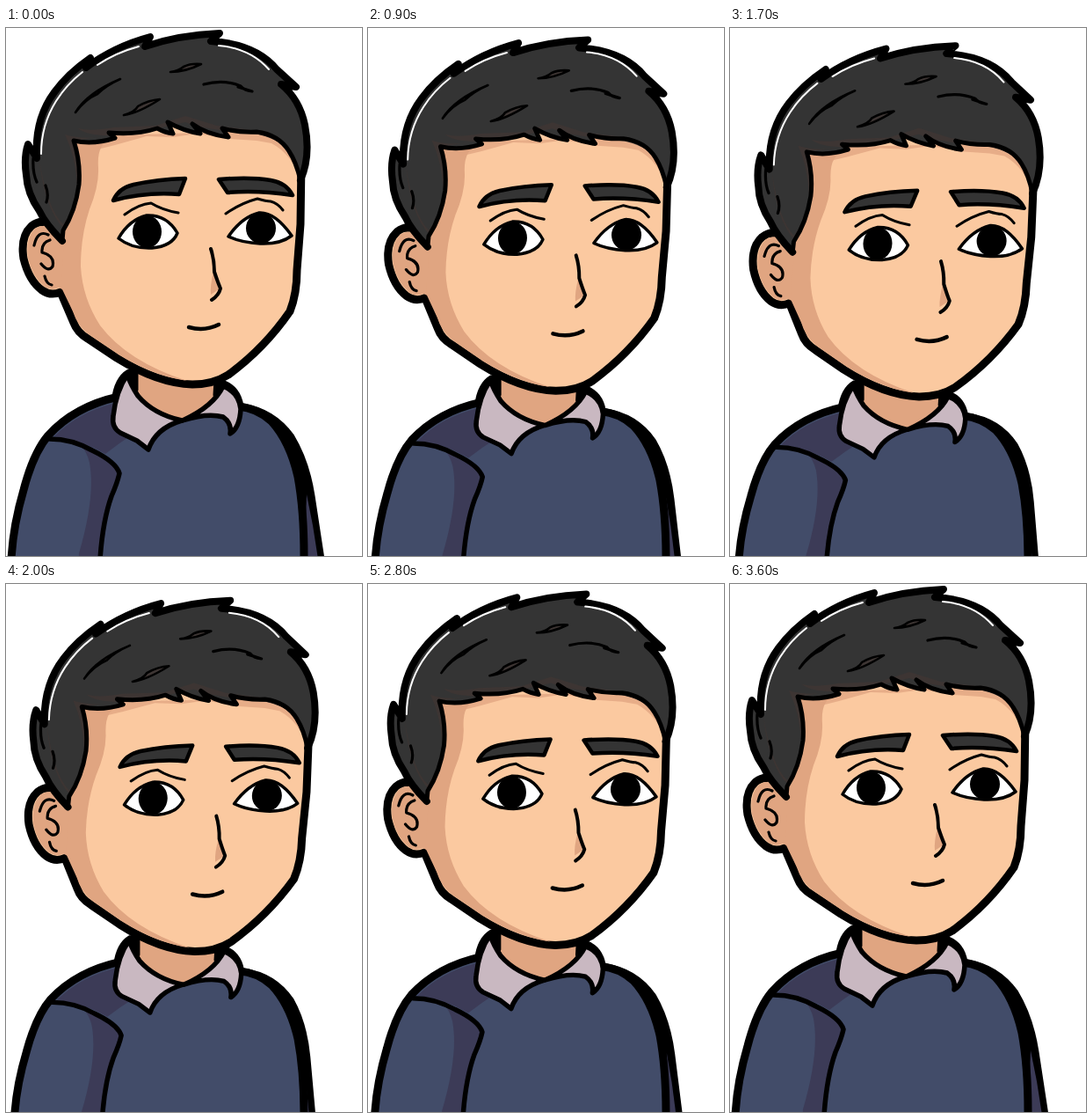
An HTML page for the animation above (3700 ms loop, 405 px wide and 600 px high).

```html
<!DOCTYPE html>
<html lang="en">
<head>
<meta charset="utf-8">
<title>Portrait</title>
<style>
  html, body { margin: 0; width: 100%; height: 100%; overflow: hidden; background: #fff; }
  svg { display: block; width: 405px; height: 600px; --p: 0; }
  path, ellipse { stroke-linecap: round; stroke-linejoin: round; }
  .head { transform: matrix(1, calc(.008 * var(--p)), calc(-.0275 * var(--p)), 1, calc(14 * var(--p)), calc(1 + 12.5 * var(--p))); }
  .body { transform: matrix(calc(1 - .012 * var(--p)), 0, 0, calc(1 - .04 * var(--p)), calc(4 * var(--p)), calc(28.3 * var(--p))); }
  .arm { transform: matrix(1, 0, calc(-.075 * var(--p)), calc(1 - .04 * var(--p)), calc(34 * var(--p)), calc(28.3 * var(--p))); }
  .line { fill: none; stroke: #000; }
  .edge { stroke: #000; stroke-width: 9; }
  .skin { fill: #fbc9a0; }
  .tan { fill: #e0a581; }
  .wool { fill: #424c69; }
  .dusk { fill: #3c3b57; }
  .linen { fill: #c9b8c1; stroke: #000; stroke-width: 5.5; }
  .hair { fill: #343434; }
  .brow { fill: #343434; stroke: #000; stroke-width: 4.5; }
  .shine { fill: none; stroke: #fff; stroke-width: 2; }
</style>
</head>
<body>
<svg viewBox="0 0 405 600">
  <g class="arm">
    <path class="edge" d="M268 431Q303 436 324 465Q341 493 347 532L358 604L358 640L320 640L300 470Z"/>
    <path class="dusk" d="M342 530Q350 566 355 604L355 640L338 640Z"/>
  </g>

  <g class="body">
    <path class="wool edge" d="M128 419Q78 430 48 463Q31 483 20 525Q8 566 6 604L6 650L339 650L339 600Q339 548 332 510Q323 470 302 447Q286 432 264 430Z"/>
    <path class="dusk" d="M121 427Q82 437 55 464Q86 468 113 484L129 472L138 466L125 458Z"/>
    <path class="dusk" d="M84 473Q105 484 128 502Q126 514 118 533Q108 565 107 650L81 650L83 597Q102 532 95 494Q92 481 84 473Z"/>
    <path class="line" stroke-width="5.5" d="M50 467Q75 467 98 480Q125 493 129 506Q127 516 120 532Q110 560 107 604L107 650"/>
    <path d="M138 388Q123 397 120 422L158 434L153 388ZM236 401L250 401Q269 409 271 434L240 430Z"/>
    <path class="tan" d="M147 386L148 410Q162 436 200 445Q227 436 239 414L242 384Z"/>
    <path class="line" stroke-width="5" d="M148 390L148 411M239 400L238 417"/>
    <path class="linen" d="M138 394Q125 413 122 441Q120 454 130 460L149 469L162 479Q170 455 200 446Q168 439 150 418Q142 406 138 394Z"/>
    <path class="linen" d="M247 407Q236 430 201 446Q229 437 247 442Q257 449 255 461Q266 454 267 433Q265 414 247 407Z"/>
  </g>

  <g class="head">
    <path class="skin edge" d="M66 234Q45 211 29 224Q16 236 20 261Q26 286 41 297Q51 304 62 299L77 334Q81 345 93 352L126 374Q173 403 212 404Q236 404 253 393Q294 363 323 321Q331 301 331 274L335 222L336 150L300 95L100 100Z"/>
    <path class="tan" d="M66 234Q47 218 33 227Q22 238 25 260Q30 282 44 293Q52 298 60 294L72 300L76 240Z"/>
    <path class="tan" d="M69 120L119 127Q103 130 105 158Q106 178 95 205Q85 235 85 270Q87 306 107 337Q138 378 206 400Q167 394 128 370L94 347Q81 337 76 321L63 294L66 240Z"/>
    <path class="tan" d="M82 122L320 115Q334 130 335 172Q326 143 302 130L285 127L252 125L218 119L190 123L160 122L124 132L100 138Z" opacity=".75"/>
    <path class="line" stroke-width="3.2" d="M32 246Q36 228 48 234M50 240Q40 243 41 254Q56 258 53 270Q48 277 40 267M44 281Q46 290 52 291"/>

    <path class="hair" d="M64 241Q45 222 38 207Q24 187 23 166Q20 146 25 131L35 147Q32 103 55 72Q70 51 96 33L91 44Q123 20 164 9L158 20Q196 7 243 5L233 14Q284 17 308 46L330 66L313 63Q334 80 340 109Q347 145 335 172Q330 151 322 139Q310 120 285 117Q265 118 246 113L253 123Q228 120 212 108L221 119Q202 116 184 106L190 119Q181 118 172 113Q148 121 117 118L124 124Q99 132 77 127Q85 151 83 177Q79 207 65 229Z"/>
    <path d="M38 149Q47 205 65 222Q79 204 81 177Q79 145 67 120Q91 127 115 121Q92 121 82 113Q96 117 122 112L170 110L204 99L240 110L280 115Q313 119 331 149Q318 127 287 120L250 116L217 111L204 106L174 113L116 121L77 127Q87 168 77 202L66 227Q44 205 38 149Z" fill="#3d3533"/>
    <path class="line" stroke-width="8" d="M64 241Q45 222 38 207Q24 187 23 166Q20 146 25 131L35 147Q32 103 55 72Q70 51 96 33L91 44Q123 20 164 9L158 20Q196 7 243 5L233 14Q284 17 308 46L330 66L313 63Q334 80 340 109Q347 145 335 172"/>
    <path class="line" stroke-width="5" d="M335 172Q330 151 322 139Q310 120 285 117Q265 118 246 113L253 123Q228 120 212 108L221 119Q202 116 184 106L190 119Q181 118 172 113Q148 121 117 118L124 124Q99 132 77 127Q85 151 83 177Q79 207 65 229L64 241"/>
    <path class="shine" d="M40 142Q40 109 57 82Q69 63 87 49M104 41Q125 27 151 20M242 19Q278 22 299 46"/>
    <path fill="#3d3533" stroke="#000" stroke-width="2.600" d="M79 95Q92 73 130 57Q114 64 104 74Q90 80 79 95ZM134 98Q150 96 175 80Q162 81 150 88Q147 94 134 98ZM187 49Q204 49 222 40Q210 39 202 43Q196 48 187 49Z"/>
    <path class="line" stroke-width="3.2" d="M225 63Q248 57 267 65Q271 70 280 71M264 66L280 71M31 147Q30 163 35 174M45 178Q49 188 46 197"/>

    <path class="brow" d="M122 195Q128 181 145 177Q172 171 204 170L197 188Q159 185 122 195Z"/>
    <path class="brow" d="M242 171Q278 168 301 172Q319 175 326 189Q286 183 252 186Z"/>
    <path class="line" stroke-width="3" d="M135 211Q151 199 165 198Q178 206 196 209M250 210Q267 198 286 193Q296 196 301 196Q309 198 315 206"/>

    <g fill="#fff" stroke="#000" stroke-width="3.5">
      <path d="M128 238Q140 217 160 212Q183 211 195 232Q189 247 166 249Q143 250 128 238Z"/>
      <path d="M253 236Q268 214 288 209Q306 208 325 235Q312 245 289 244Q268 243 253 236Z"/>
    </g>
    <ellipse cx="160.500" cy="230.500" rx="16.5" ry="18.5"/>
    <ellipse cx="290" cy="226.500" rx="17" ry="17.500"/>

    <path class="tan" d="M236 276L242 296L233 302Q232 292 236 276Z"/>
    <path class="line" stroke-width="4" d="M233 250Q237 262 237 276Q241 288 244 295Q242 303 234 308"/>
    <path class="line" stroke-width="4.5" d="M208 339Q226 344 242 336"/>
  </g>
</svg>
<script>
  const svg = document.querySelector('svg');
  const STEP = 100, STEPS = 37, PEAK = 17.5;

  // A mostly linear sway, softened at its ends
  const ease = u => .75 * u + .25 * (1 - Math.cos(Math.PI * u)) / 2;

  function draw() {
    const n = Math.floor(performance.now() / STEP) % STEPS;
    const u = Math.max(0, 1 - Math.abs(n - PEAK) / PEAK);
    svg.style.setProperty('--p', ease(u).toFixed(4));
    requestAnimationFrame(draw);
  }
  draw();
</script>
</body>
</html>
```
